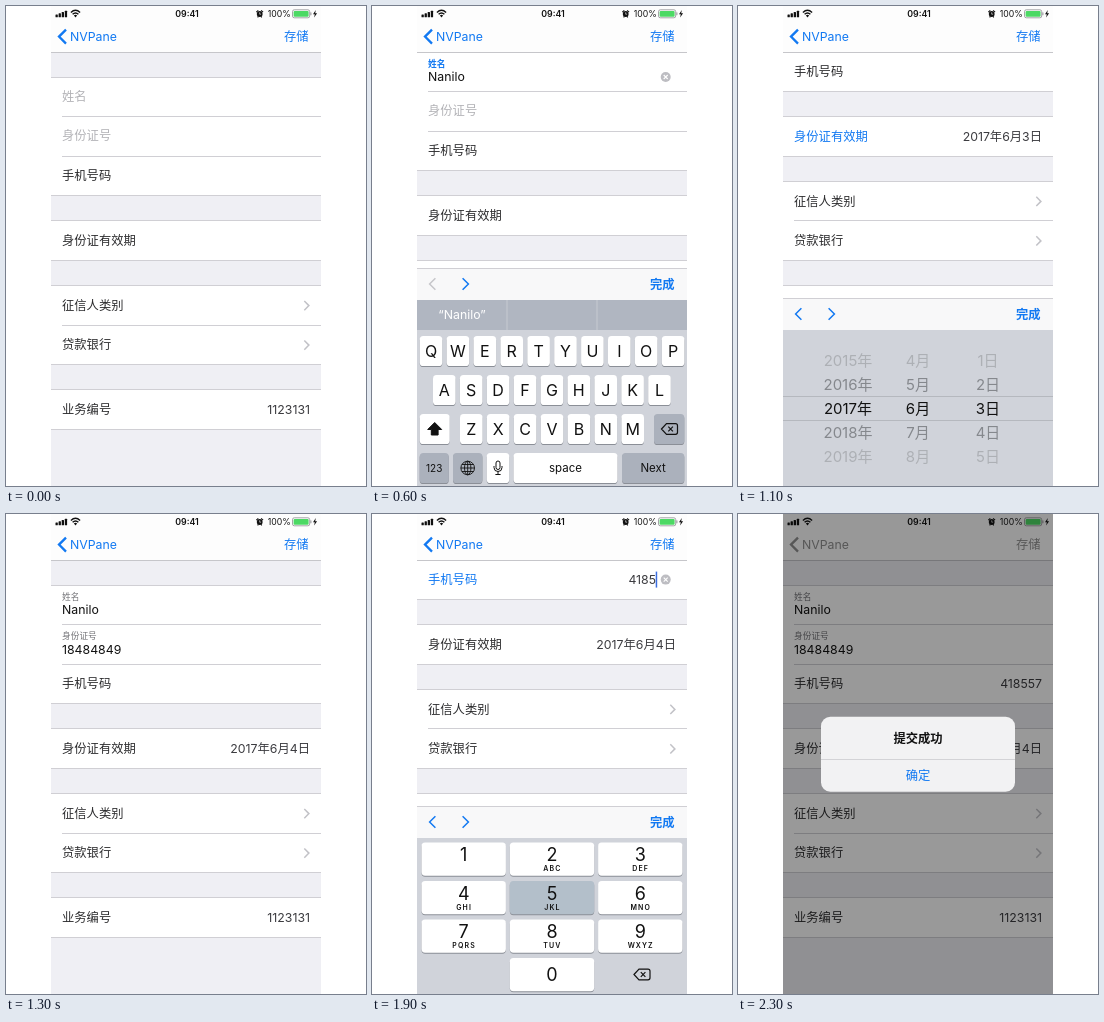
An HTML page that plays this animation: 360 px wide and 480 px high, repeating every 2.4 s.

```html
<!DOCTYPE html>
<html lang="zh">
<head>
<meta charset="utf-8">
<title>Form</title>
<style>
  html, body { margin: 0; width: 100%; height: 100%; overflow: hidden; background: #fff; }
  svg { display: block; width: 360px; height: 480px; }
  text { font-family: Inter, "Noto Sans CJK SC", "Noto Sans CJK", "Liberation Sans", sans-serif; white-space: pre; }
</style>
</head>
<body>
<svg id="stage" viewBox="0 0 360 480"></svg>
<script>
const STEP = 100, STEPS = 24;
const BLUE = '#1279f2', INK = '#2c2c2e', LINE = '#d0cfd4', KEY_GREY = '#abb1bc', GROUP = '#efeff4';
const ROW = 39.5, BODY = 12.3;
const USER = 'Nanilo', ID = '18484849';

// Each cue changes part of the state and the rest carries over.
const cues = {
  0: { name: '', id: '', phone: '', date: '', focus: '', panel: 'letters', rise: 0, offset: 0, alert: '', fade: 0, saving: false },
  2: { focus: 'name', rise: 0.25, offset: 25 },
  3: { rise: 0.706 },
  4: { rise: 1 },
  5: { name: USER.slice(0, 3) },
  6: { name: USER },
  7: { focus: 'id', panel: 'symbols' },
  8: { id: ID.slice(0, 4) },
  9: { id: ID },
  11: { focus: 'date', panel: 'wheel', offset: 104.2, date: '2017年6月3日' },
  12: { date: '2017年6月4日' },
  13: { focus: '', rise: 0, offset: 0 },
  14: { saving: true },
  15: { saving: false, alert: 'error', fade: 0.6 },
  16: { fade: 1 },
  17: { alert: '', fade: 0, focus: 'phone', panel: 'digits', rise: 0.7, offset: 104.2 },
  18: { rise: 1, phone: '41' },
  19: { phone: '4185' },
  20: { phone: '418557' },
  21: { focus: '', rise: 0, offset: 0 },
  22: { alert: 'done', fade: 0.6 },
  23: { fade: 1 }
};

const rect = (x, y, w, h, fill, r = 0) =>
  `<rect x="${x}" y="${y}" width="${w}" height="${h}" rx="${r}" fill="${fill}"/>`;

const path = (d, stroke, width = 1, fill = 'none') =>
  `<path d="${d}" stroke="${stroke}" stroke-width="${width}" fill="${fill}"/>`;

// y is the optical middle of the line of text.
const text = (s, x, y, { size = BODY, fill = INK, anchor = 'start', weight = 400, spacing = 0 } = {}) =>
  `<text x="${x}" y="${y + size * 0.365}" font-size="${size}" fill="${fill}" text-anchor="${anchor}" font-weight="${weight}" letter-spacing="${spacing}">${s}</text>`;

const mid = (s, x, y, options) => text(s, x, y, { anchor: 'middle', ...options });

const rule = (x, y) => rect(x, Math.floor(y), 315 - x, 1, LINE);

const chevron = (x, y, dir, h, color, width) =>
  path(`M${x - dir * h / 2} ${y - h}l${dir * h} ${h}l${-dir * h} ${h}`, color, width);

function clearButton(y) {
  return `<circle cx="293.7" cy="${y}" r="5" fill="#bdbdc2"/>` +
    path(`M291.7 ${y - 2}l4 4m0 -4l-4 4`, '#fff', 1.1);
}

const caret = (x, y) => rect(x, y - 8, 1.5, 16, '#3c6fe0');

function floatingField(key, label, y, state) {
  const value = state[key], active = state.focus === key;
  if (!value) {
    return text(label, 56, y + 19.5, { fill: '#b3b3b7' }) + (active ? caret(56, y + 19.5) : '');
  }
  return text(label, 56, y + 11.5, { size: 8.7, fill: active ? BLUE : '#747478', weight: active ? 700 : 500 }) +
    text(value, 56, y + 25, { fill: '#111' }) + (active ? clearButton(y + 25) : '');
}

function detailRow(key, label, y, state) {
  const active = state.focus === key, editing = active && key === 'phone';
  const middle = y + 19.8;
  return text(label, 56, middle, { fill: active ? BLUE : INK }) +
    text(state[key] || '', editing ? 284 : 304, middle, { anchor: 'end', fill: '#3c3c40' }) +
    (editing ? caret(283.7, middle) + clearButton(middle) : '');
}

const linkRow = (label, y) => text(label, 56, y + 19.8) + chevron(300.6, y + 20, 1, 4.6, '#c2c2c7', 1.5);

function form(state) {
  const data = { ...state, serial: '1123131' };
  const sections = [
    [y => floatingField('name', '姓名', y, data),
     y => floatingField('id', '身份证号', y, data),
     y => detailRow('phone', '手机号码', y, data)],
    [y => detailRow('date', '身份证有效期', y, data)],
    [y => linkRow('征信人类别', y), y => linkRow('贷款银行', y)],
    [y => detailRow('serial', '业务编号', y, data)]
  ];
  let y = 71 - state.offset * state.rise, out = rect(45, 46, 270, 434, GROUP);
  for (const rows of sections) {
    out += rect(45, y, 270, rows.length * ROW, '#fff') + rule(45, y);
    rows.forEach((draw, i) => {
      out += draw(y);
      y += ROW;
      out += rule(i === rows.length - 1 ? 45 : 56, y);
    });
    y += 25.3;
  }
  return out;
}

function key(x, y, w, h, label = '', { fill = '#fff', size = 16, weight = 400 } = {}) {
  return rect(x, y + 1, w, h, '#8b8f97', 3.6) + rect(x, y, w, h, fill, 3.6) +
    mid(label, x + w / 2, y + h / 2, { size, weight, fill: '#111' });
}

const keyRow = (labels, x, y, pitch = 26.9, w = 22.6) =>
  [...labels].map((c, i) => key(x + i * pitch, y, w, 30, c)).join('');

const backspace = (x, y) =>
  path(`M${x - 8} ${y}l5 -5.3h9q2 0 2 2v6.6q0 2 -2 2h-9z`, '#111', 1.2) +
  path(`M${x - 1.2} ${y - 2.3}l4.6 4.6m0 -4.6l-4.6 4.6`, '#111', 1.2);

const globe = (x, y) =>
  `<g fill="none" stroke="#111" stroke-width=".9"><circle cx="${x}" cy="${y}" r="6.8"/><ellipse cx="${x}" cy="${y}" rx="3.2" ry="6.8"/>` +
  `<path d="M${x - 6.8} ${y}h13.6M${x} ${y - 6.8}v13.6M${x - 5.8} ${y - 3.5}h11.6M${x - 5.8} ${y + 3.5}h11.6"/></g>`;

const mic = (x, y) =>
  `<rect x="${x - 2}" y="${y - 7}" width="4" height="8.5" rx="2" fill="none" stroke="#111"/>` +
  path(`M${x - 4} ${y - 2}v1.5a4 4 0 0 0 8 0v-1.5M${x} ${y + 3.5}v3m-2.6 0h5.2`, '#111');

function accessory(state) {
  return rect(45, 0, 270, 32, '#f8f8f9') + rule(45, 0) +
    chevron(60.5, 16, -1, 5.8, state.focus === 'name' ? '#c6c6ca' : BLUE, 1.5) +
    chevron(93.5, 16, 1, 5.8, BLUE, 1.5) +
    text('完成', 278, 16.5, { fill: BLUE, weight: 600 });
}

function suggestions(state) {
  const typed = state[state.focus];
  const words = typed ? [`“${typed}”`, '', ''] : state.focus === 'name' ? ['I', USER, 'And'] : [];
  return rect(45, 32, 270, 30, '#b0b6c1') +
    [135, 225].map(x => rect(x - 0.5, 32, 1, 30, '#c5cad2')).join('') +
    words.map((w, i) => mid(w, 90 + i * 90, 46.5, { fill: '#fff' })).join('');
}

function keyboard(state) {
  const grey = { fill: KEY_GREY, size: 9.5 };
  const letters = state.panel === 'letters';
  const rows = letters
    ? keyRow('QWERTYUIOP', 47.7, 68) + keyRow('ASDFGHJKL', 61, 107) +
      key(47.7, 146, 30, 30) + path('M62.7 154.5l-7 7h3.6v5.5h6.8v-5.5h3.6z', '#111', 1, '#111') +
      keyRow('ZXCVBNM', 88, 146)
    : keyRow('1234567890', 47.7, 68) + keyRow('-/:;()¥', 47.7, 107) +
      key(236, 107, 22.6, 30, '&amp;') + keyRow('@”', 262.9, 107) +
      key(47.7, 146, 30, 30, '#+=', { ...grey, size: 9 }) + keyRow('.,?!’', 88, 146, 37.8, 33);
  return suggestions(state) + rows +
    key(282, 146, 30.3, 30, '', grey) + backspace(297.5, 161) +
    key(47.7, 185, 29, 30, letters ? '123' : 'ABC', { ...grey, size: 10 }) +
    key(81, 185, 29.4, 30, '', grey) + globe(95.7, 200) +
    key(114.7, 185, 22.6, 30) + mic(126, 200) +
    key(141.5, 185, 104, 30, 'space', { size: 11.5 }) +
    key(250, 185, 62.3, 30, 'Next', { ...grey, size: 11.5 });
}

function keypad(state) {
  const captions = ['', 'ABC', 'DEF', 'GHI', 'JKL', 'MNO', 'PQRS', 'TUV', 'WXYZ'];
  const keys = captions.map((caption, i) => {
    const x = 49.5 + (i % 3) * 88.3, y = 36.5 + Math.floor(i / 3) * 38.5;
    const pressed = state.phone.endsWith(i + 1);
    return key(x, y, 84.4, 33.2, '', { fill: pressed ? '#b3bfca' : '#fff' }) +
      mid(i + 1, x + 42.2, y + 12, { size: 18, fill: '#111' }) +
      mid(caption, x + 42.6, y + 26, { size: 7, fill: '#111', weight: 600, spacing: 1.1 });
  });
  return keys.join('') + key(137.8, 152, 84.4, 33.2, '0', { size: 18 }) + backspace(270, 168.5);
}

function wheel(state) {
  const values = state.date.match(/\d+/g).map(Number);
  let out = rect(45, 98, 270, 1, '#b5b8be') + rect(45, 122, 270, 1, '#b5b8be');
  for (let d = -2; d <= 2; d++) {
    values.forEach((v, i) => {
      const shade = ['#111', '#85888d', '#adb0b5'][Math.abs(d)];
      out += mid(v + d + '年月日'[i], 110 + i * 70, 110.5 + d * 24, { size: 15, fill: shade });
    });
  }
  return out;
}

function panel(state) {
  if (!state.rise) return '';
  const draw = { letters: keyboard, symbols: keyboard, digits: keypad, wheel }[state.panel];
  const height = draw === keyboard ? 218 : 188;
  return `<g transform="translate(0 ${480 - height * state.rise})">` +
    rect(45, 0, 270, height, '#d0d3da') + accessory(state) + draw(state) + '</g>';
}

function header(state) {
  const tint = state.alert ? '#909090' : BLUE;
  const bars = [0, 1, 2, 3].map(i => rect(49.5 + i * 3.1, 8.6 - i * 1.3, 2.3, 2.7 + i * 1.3, '#111', 0.5)).join('');
  const wifi = path('M64.9 6.4q4.6 -4.2 9.2 0M66.6 8.3q2.9 -2.6 5.8 0', '#111', 1.4) +
    path('M67.9 9.5q1.6 -1.3 3.2 0l-1.6 1.9z', 'none', 0, '#111');
  const alarm = '<circle cx="253.7" cy="8" r="2.9" fill="#111"/>' +
    path('M250.3 6.1l2 -1.7m4.8 1.7l-2 -1.7M251.6 11.3l.8 -1m3.4 1l-.8 -1', '#111', 1.1) +
    path('M253.7 6.3v1.9h1.4', '#fff', 0.6);
  const battery = '<rect x="286.5" y="3.8" width="17.2" height="8" rx="1.8" fill="none" stroke="#8e8e92" stroke-width=".8"/>' +
    rect(287.6, 4.9, 15, 5.8, '#4cd964', 1) + rect(304.4, 6.3, 1, 3, '#8e8e92', 0.5) +
    path('M309.8 4l-2.8 4.2h1.8l-.7 3.4l3 -4.4h-1.9z', 'none', 0, '#111');
  return rect(45, 0, 270, 46, '#fdfdfd') + rect(45, 46, 270, 1, '#c6c6ca') +
    bars + wifi + mid('09:41', 181, 7.7, { size: 8.8, weight: 600, fill: '#111' }) +
    alarm + text('100%', 261.7, 7.8, { size: 8.7, fill: '#111' }) + battery +
    path('M60 23.6l-7 7l7 7', tint, 2.3) + text('NVPane', 64, 30.6, { fill: tint }) +
    `<g opacity="${state.saving ? 0.3 : 1}">${text('存储', 278, 30.6, { fill: tint })}</g>`;
}

function alertBox({ alert, fade }) {
  if (!alert) return '';
  const error = alert === 'error';
  const top = error ? 195.5 : 202.8, height = error ? 89.5 : 75;
  const line = top + height - 32;
  const scale = 1 + (1 - fade) * 0.15;
  return `<rect x="45" width="270" height="480" fill="#000" opacity="${0.4 * fade}"/>` +
    `<g opacity="${fade}" transform="translate(180 240) scale(${scale}) translate(-180 -240)">` +
    rect(83, top, 194, height, '#f2f2f3', 9.4) + rect(83, Math.floor(line), 194, 1, '#d3d3d6') +
    mid(error ? '错误' : '提交成功', 180, top + 21.5, { weight: 600, fill: '#111' }) +
    (error ? mid('手机号码 不能为空', 180, top + 37, { size: 9.4, fill: '#111' }) : '') +
    mid('确定', 180, line + 16, { fill: BLUE }) + '</g>';
}

function stateAt(step) {
  const state = {};
  for (let i = 0; i <= step; i++) Object.assign(state, cues[i]);
  return state;
}

const stage = document.getElementById('stage');
let shown = -1;

function render(now) {
  const step = Math.floor(now / STEP) % STEPS;
  if (step !== shown) {
    const state = stateAt(step);
    stage.innerHTML = form(state) + panel(state) + header(state) + alertBox(state);
    shown = step;
  }
}

const start = performance.now();
function tick() {
  render(performance.now() - start);
  requestAnimationFrame(tick);
}
tick();
</script>
</body>
</html>
```
